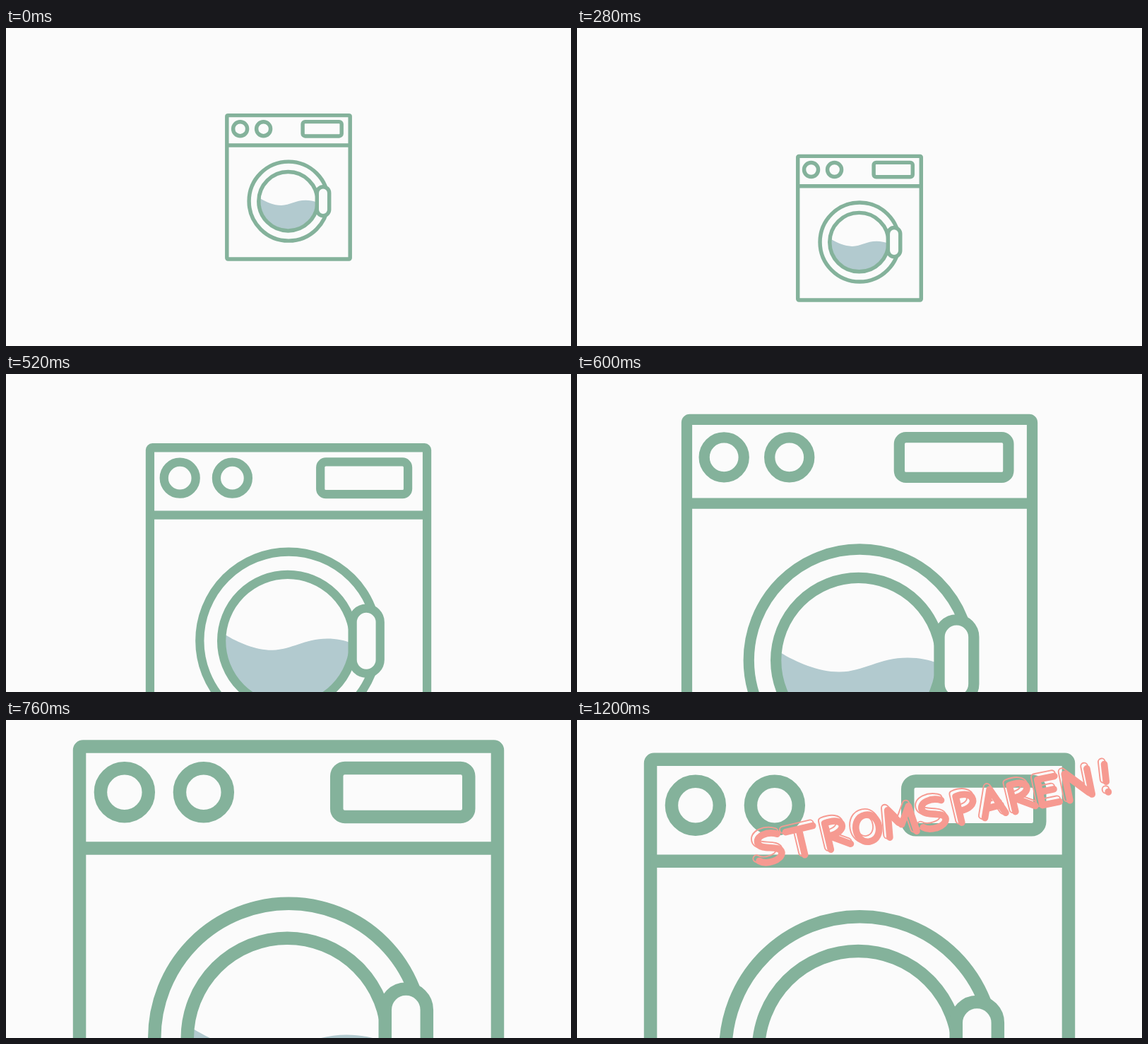
An HTML page for the animation above (1.32 s loop, 800 px wide and 450 px high).

```html
<!DOCTYPE html>
<html lang="de">
<head>
<meta charset="utf-8">
<title>Stromsparen</title>
<style>
  html, body { margin: 0; width: 100%; height: 100%; overflow: hidden; background: #fbfbfb; }
  svg { display: block; width: 100vw; height: 100vh; }
  .line { fill: none; stroke: #84b29b; stroke-width: 5.45; }
  .word { stroke: #f69a91; }
  #letters { fill: none; stroke-linecap: round; stroke-linejoin: round; }
</style>
</head>
<body>
<svg viewBox="0 0 800 450">
  <defs>
    <clipPath id="glass"><circle cx="-.5" cy="20" r="39.5"/></clipPath>
    <g id="letters"></g>
    <mask id="rim" maskUnits="userSpaceOnUse" x="-300" y="-60" width="600" height="120">
      <use href="#letters" stroke="#fff" stroke-width="10.4"/>
      <use href="#letters" stroke="#000" stroke-width="7"/>
    </mask>
  </defs>

  <g id="washer" class="line">
    <rect x="-87.2" y="-101.6" width="174.4" height="203.4" rx="1.5"/>
    <path d="M-87-59.2H87"/>
    <circle cx="-68.4" cy="-82.5" r="10"/>
    <circle cx="-35.4" cy="-82.5" r="10"/>
    <rect x="20.1" y="-92.6" width="55.1" height="20.3" rx="3.4"/>
    <path clip-path="url(#glass)" fill="#b2cacf" stroke="none"
      d="M-40 16C-32 21-20 26-10 25.8C2 25.6 10 18.6 24.3 18.6C31 18.6 36 20 40 21.5V62H-40Z"/>
    <circle cx=".1" cy="19.9" r="56"/>
    <circle cx="-.5" cy="20" r="41.7"/>
    <rect x="40.3" y="-.5" width="17.4" height="41" rx="8.7" fill="#fbfbfb"/>
  </g>

  <g id="slogan" class="word" role="img" aria-label="STROMSPAREN!"
     transform="translate(503 130) rotate(-11.6)">
    <rect x="-300" y="-60" width="600" height="120" fill="#f69a91" stroke="none"
      mask="url(#rim)" transform="translate(-3 -4)"/>
    <use href="#letters" stroke-width="8.6"/>
  </g>
</svg>
<script>
  const LOOP = 1320, MOVE_END = 850, ZOOM_START = 280, ZOOM_END = 680, FADE_END = 1080;
  const $ = id => document.getElementById(id);

  // hand-lettered strokes, each centred on its own origin
  const strokes = {
    S: 'M13-14C2-20-16-17-13-6C-10 3 14 0 14 10C13 20-8 22-16 15',
    T: 'M-17-14L18-15M0-14L1 19',
    R: 'M-12 19L-13-15C14-20 15 1-10 2L14 17',
    O: 'M0-15C-20-15-20 19-1 19C19 19 19-15 0-15Z',
    M: 'M-18 19L-14-15L0 6L13-15L17 18',
    P: 'M-9 19L-10-15C17-20 17 5-8 4',
    A: 'M-14 19L-1-15L13 18M-9 8L9 7',
    E: 'M12-15H-10V18H12M-10 1H8',
    N: 'M-15 19V-15L14 17V-16',
    '!': 'M1-17L-1 5M-1 18V18.5'
  };
  const places = [-236, -190, -138, -94, -46, 1, 48, 87, 129, 166, 211, 251];
  $('letters').innerHTML = [...'STROMSPAREN!']
    .map((c, i) => `<path transform="translate(${places[i]} 2) scale(1.12)" d="${strokes[c]}"/>`)
    .join('');

  const span = (t, a, b) => Math.min(1, Math.max(0, (t - a) / (b - a)));

  function draw(t) {
    const y = 225 + 175.7 * span(t, 0, MOVE_END);
    const zoom = 1 + 2.394 * span(t, ZOOM_START, ZOOM_END) ** 1.285;
    $('washer').setAttribute('transform', `translate(400 ${y}) scale(${zoom})`);
    $('slogan').setAttribute('opacity', 1 - (1 - span(t, MOVE_END, FADE_END)) ** 3);
  }

  const start = performance.now();
  function tick() {
    draw((performance.now() - start) % LOOP);
    requestAnimationFrame(tick);
  }
  draw(0);
  requestAnimationFrame(tick);
</script>
</body>
</html>
```
